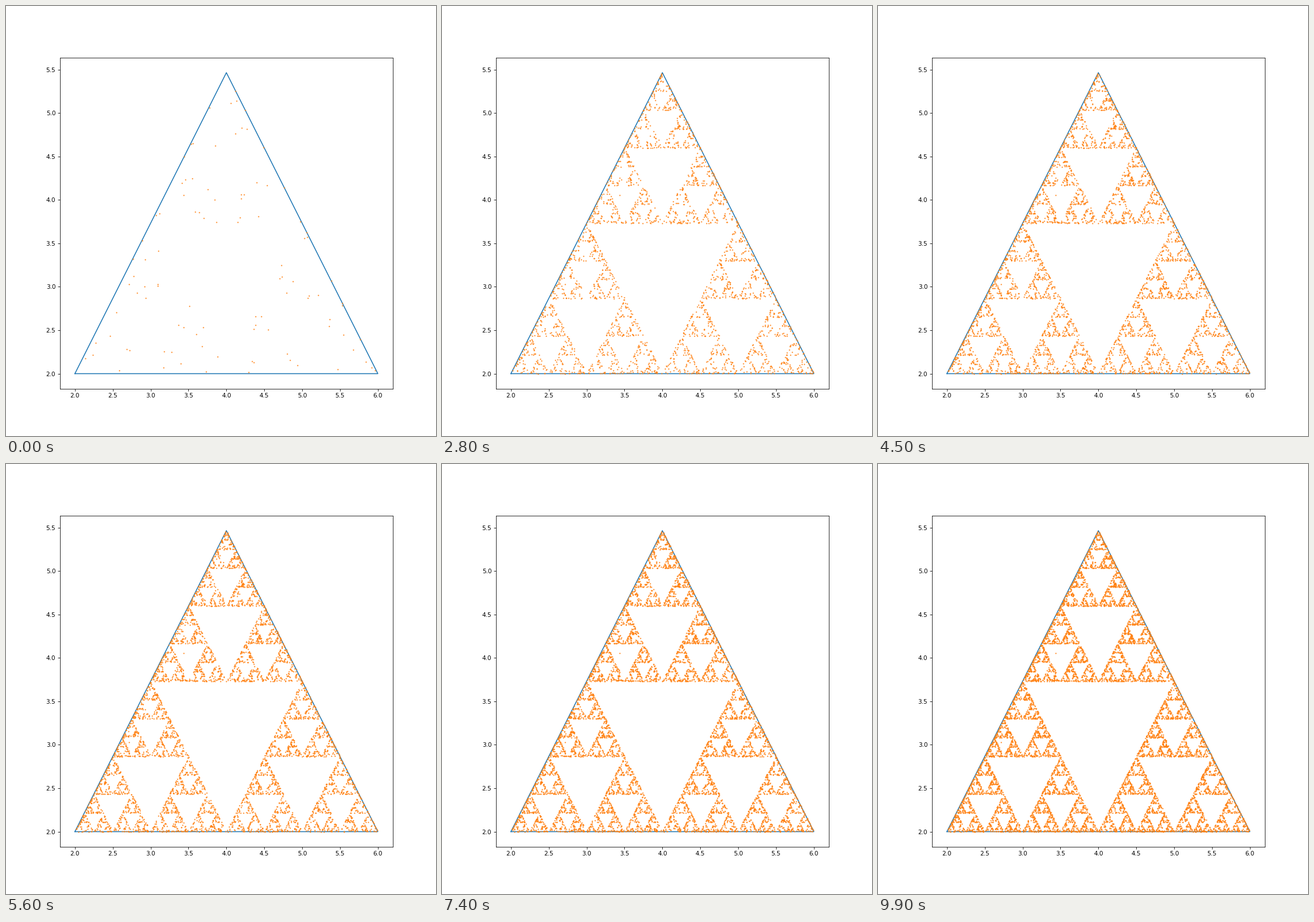
A matplotlib script for the animation above (10 s loop, 748 by 748 pixels).

```python
import numpy as np
import matplotlib.pyplot as plt
from matplotlib.animation import FuncAnimation

FRAMES, INTERVAL = 100, 100
PER_FRAME = 100
TOTAL = FRAMES * PER_FRAME

# Corners: left, right, top
CORNERS = np.array([(2, 2), (6, 2), (4, 2 + 2 * np.sqrt(3))])
START = (3.436, 4.052)
OPENING = (0, 1, 0, 2)


def chaos_game(n, seed=7):
    """Jump halfway to a random corner, over and over."""
    picks = np.random.default_rng(seed).integers(0, 3, n)
    picks[:len(OPENING)] = OPENING
    points = np.empty((n, 2))
    points[0] = START
    for k in range(1, n):
        points[k] = (points[k - 1] + CORNERS[picks[k - 1]]) / 2
    return points


points = chaos_game(TOTAL)

fig, ax = plt.subplots(figsize=(10, 10), dpi=74.8)
outline = CORNERS[[0, 1, 2, 0]]
ax.plot(outline[:, 0], outline[:, 1], color="C0")
dots, = ax.plot([], [], "o", color="C1", markersize=1)


def update(frame):
    shown = points[:(frame + 1) * PER_FRAME]
    dots.set_data(shown[:, 0], shown[:, 1])
    return dots,


anim = FuncAnimation(fig, update, frames=FRAMES, interval=INTERVAL,
                     repeat=True, repeat_delay=0)
plt.show()
```
